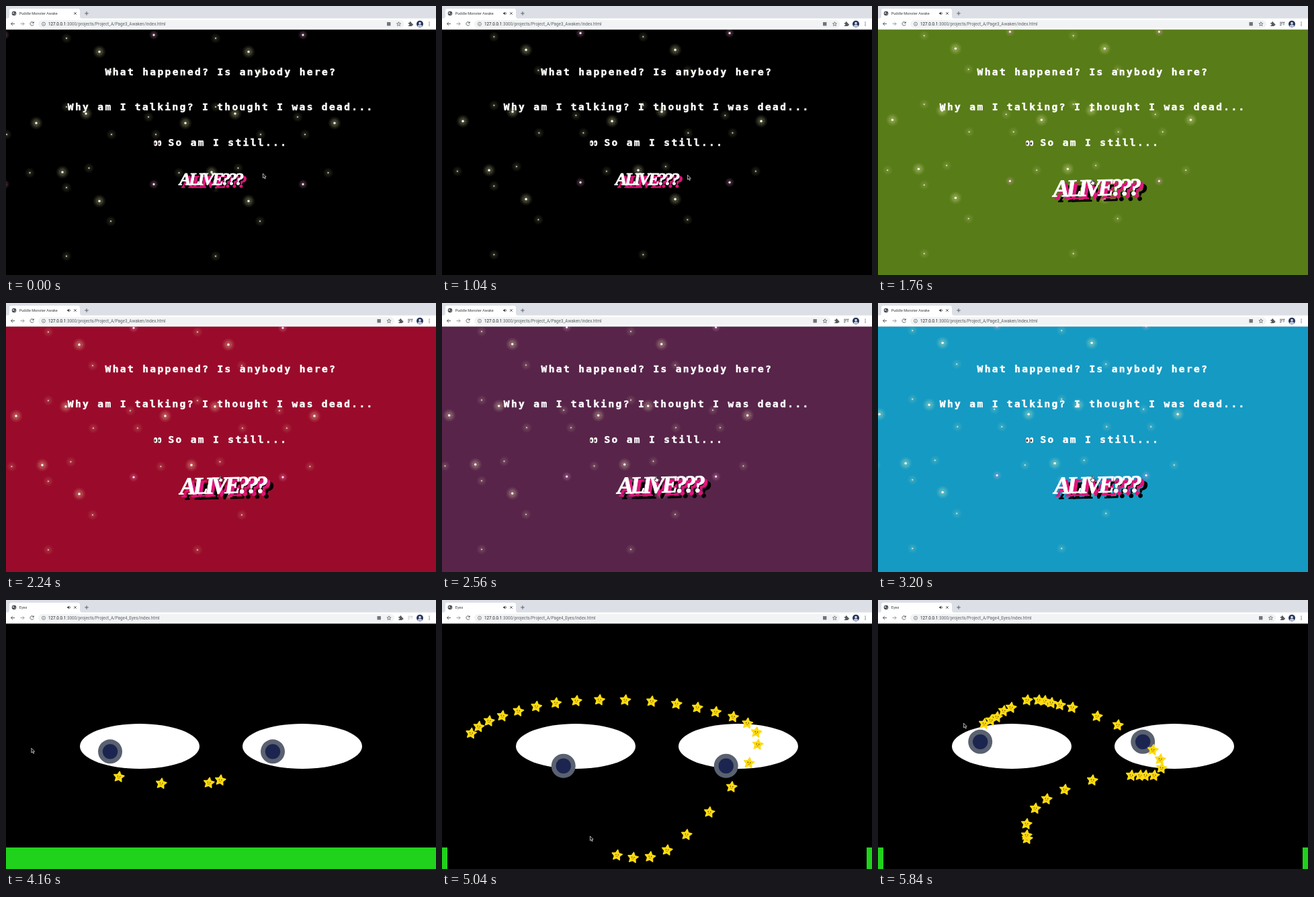
Recreate the animation shown at these times as an HTML page. Size 640 px wide and 400 px high, loop 5920 ms.

```html
<!DOCTYPE html>
<html lang="en">
<head>
<meta charset="utf-8">
<title>Awake</title>
<style>
  html, body { margin: 0; width: 100%; height: 100%; overflow: hidden; background: #000; }
  svg { display: block; width: 640px; height: 400px; }
  text { white-space: pre; }
  .ui { font-family: Roboto, Inter, sans-serif; }
  .say { font: bold 14.5px "DejaVu Sans Mono", monospace; letter-spacing: 2.39px; fill: #fff; stroke: #fff; stroke-width: .5; }
  .cry { font-family: "Liberation Serif", serif; font-weight: bold; font-style: italic; stroke-width: .9; stroke-linejoin: round; }
  .line { fill: none; stroke: #5f6368; stroke-width: 1; }
</style>
</head>
<body>
<svg viewBox="0 0 640 400" xmlns="http://www.w3.org/2000/svg">
  <defs>
    <radialGradient id="warm">
      <stop offset="0" stop-color="#ffffd8" stop-opacity=".6"/>
      <stop offset=".3" stop-color="#ffffc0" stop-opacity=".24"/>
      <stop offset="1" stop-color="#ffffb0" stop-opacity="0"/>
    </radialGradient>
    <radialGradient id="pink">
      <stop offset="0" stop-color="#ffe0f4" stop-opacity=".7"/>
      <stop offset=".35" stop-color="#ff9ed8" stop-opacity=".2"/>
      <stop offset="1" stop-color="#ffb0e0" stop-opacity="0"/>
    </radialGradient>
    <g id="big">
      <circle r="10" fill="url(#warm)"/>
      <circle r="4.6" fill="none" stroke="#ffffd0" stroke-width=".8" stroke-dasharray=".8 2.3" opacity=".4"/>
      <circle r="1.6" fill="#fffff0"/>
    </g>
    <g id="mid">
      <circle r="7.5" fill="url(#pink)"/>
      <circle r="4" fill="none" stroke="#fff" stroke-width=".7" stroke-dasharray=".7 2.4" opacity=".35"/>
      <circle r="1.5" fill="#ffeaf6"/>
    </g>
    <g id="small">
      <circle r="8" fill="url(#warm)" opacity=".5"/>
      <circle r=".9" fill="#fffff0" opacity=".85"/>
    </g>
    <g id="smile" transform="rotate(8)">
      <path id="starShape" fill="#fddc10" stroke="#fddc10" stroke-width="1.6" stroke-linejoin="round"/>
      <circle cx="-1.7" cy="-.8" r=".75" fill="#5a3a05"/>
      <circle cx="1.7" cy="-.8" r=".75" fill="#5a3a05"/>
      <path d="M-1.6 1.2Q0 3 1.6 1.2" fill="none" stroke="#a8650a" stroke-width=".7"/>
    </g>
    <g id="pupil">
      <circle r="18" fill="#5a6170"/>
      <circle r="11.2" fill="#1b2550"/>
    </g>
  </defs>

  <g id="awake">
    <rect id="back" y="35" width="640" height="365"/>
    <g id="far"></g>
    <g id="near"></g>
    <text class="say" x="147.6" y="102.8">What happened? Is anybody here?</text>
    <text class="say" x="91.8" y="155.3">Why am I talking? I thought I was dead...</text>
    <g>
      <ellipse cx="222.6" cy="204" rx="2.6" ry="4.2" fill="#fff"/>
      <ellipse cx="228.6" cy="204" rx="2.6" ry="4.2" fill="#fff"/>
      <ellipse cx="221.8" cy="204.6" rx="1.3" ry="2" fill="#4a2c22"/>
      <ellipse cx="227.8" cy="204.6" rx="1.3" ry="2" fill="#4a2c22"/>
    </g>
    <text class="say" x="241.4" y="207.8">So am I still...</text>
    <g id="alive"></g>
  </g>

  <g id="eyes">
    <rect y="35" width="640" height="365" fill="#000"/>
    <rect y="368" width="640" height="32" fill="#20d21c"/>
    <rect id="bar" x="8" y="368" width="624" height="32" fill="#000"/>
    <ellipse cx="199" cy="217.5" rx="89" ry="33.5" fill="#fff"/>
    <ellipse cx="441" cy="217.5" rx="89" ry="33.5" fill="#fff"/>
    <use id="left" href="#pupil"/>
    <use id="right" href="#pupil"/>
    <g id="trail"></g>
  </g>

  <path id="arrow" d="M-1.6-4V2.8L0 1.4 1.2 4 2.3 3.5 1.2 1H3.2Z" fill="#111" stroke="#eee" stroke-width=".7"/>
  <path id="hand" d="M-1-4.2Q0-4.8.6-4V-1.2L3 -.6Q3.8 0 3.4 1.6L2.6 4H-1.2L-3.2.6Q-3-.6-1.6.2L-1 .8Z" fill="#fff" stroke="#222" stroke-width=".8"/>

  <g class="ui">
    <rect width="640" height="19" fill="#dce0e6"/>
    <path d="M2 19Q5 18.5 5 15V7Q5 4 8 4H107Q110 4 110 7V15Q110 18.5 113 19Z" fill="#fff"/>
    <rect y="18.5" width="640" height="16.5" fill="#fff"/>
    <rect y="34.5" width="640" height=".7" fill="#d5d8dc"/>
    <circle cx="12" cy="11" r="3.3" fill="#4b4f54"/>
    <path d="M9.6 10L11.4 9.3 12.2 10.6 10.8 12ZM12.6 12L14.3 11 13.6 13.1Z" fill="#dfe1e5"/>
    <text id="title" x="19.8" y="13" font-size="5.55" fill="#3c4043"></text>
    <g id="sound" fill="#45494d">
      <path d="M91.2 10H92.4L94.2 8.6V13.4L92.4 12H91.2Z"/>
      <path d="M95.2 9.6Q96.6 11 95.2 12.4" fill="none" stroke="#45494d" stroke-width=".7"/>
    </g>
    <path class="line" d="M101.2 9.2L104.8 12.8M104.8 9.2L101.2 12.8M117.2 11H122.8M120 8.2V13.8"/>
    <path class="line" d="M13 26.5H7.5M10 23.9L7.4 26.5 10 29.1"/>
    <path class="line" d="M21.5 26.5H27M24.5 23.9L27.1 26.5 24.5 29.1" opacity=".6"/>
    <path class="line" d="M41 25A2.7 2.7 0 1 0 41.2 27.4M41.3 23.4V25.4H39.3"/>
    <rect id="box" x="48" y="21" height="11.5" rx="5.7" fill="#f1f3f4"/>
    <circle class="line" cx="56" cy="26.7" r="2.6" style="stroke-width:.7"/>
    <path class="line" d="M56 26.3V28.1M56 25V25.6" style="stroke-width:.7"/>
    <text x="63" y="28.8" font-size="6.33" fill="#5f6368"><tspan fill="#202124">127.0.0.1</tspan><tspan id="path"></tspan></text>
    <g id="tools">
      <rect x="567" y="24" width="5.4" height="5.4" fill="#70757a"/>
      <path id="fav" fill="none" stroke="#5f6368" stroke-width=".8"/>
      <path d="M598.8 25H600.6A1.3 1.3 0 1 1 603 25H604.2V26.6A1.2 1.2 0 1 1 604.2 28.8V30H598.8V28.6A1.1 1.1 0 1 0 598.8 26.6Z" fill="#565a5f"/>
    </g>
    <path id="queue" class="line" d="M598 24.3H603M598 26.4H602M598 28.5H600.5M604 24V28.5M603.5 24.2H605.5"/>
    <circle cx="616" cy="26.7" r="5" fill="#253258"/>
    <path d="M612.4 30.2Q613 27.6 616 27.6T619.6 30.2Q616 33 612.4 30.2Z" fill="#b9c3dc"/>
    <circle cx="616" cy="25.6" r="1.8" fill="#d9dbe6"/>
    <g fill="#5f6368"><circle cx="630" cy="24.3" r=".75"/><circle cx="630" cy="26.7" r=".75"/><circle cx="630" cy="29.1" r=".75"/></g>
  </g>
</svg>
<script>
const LOOP = 5920, STEP = 80, HOVER = 1440, PAGE = 3680, MOVE = 4160;
const el = id => document.getElementById(id);
const show = (node, on) => { node.style.display = on ? "" : "none"; };
const put = (node, x, y, turn = 0) =>
  node.setAttribute("transform", `translate(${x.toFixed(2)} ${y.toFixed(2)}) rotate(${turn})`);
const lerp = (a, b, u) => a + (b - a) * u;
const clamp = (v, a, b) => Math.min(b, Math.max(a, v));

function make(tag, parent, attrs) {
  const node = document.createElementNS("http://www.w3.org/2000/svg", tag);
  for (const k in attrs) node.setAttribute(k, attrs[k]);
  return parent.appendChild(node);
}

function starPath(cx, cy, r, inner) {
  const pts = [];
  for (let i = 0; i < 10; i++) {
    const a = Math.PI * i / 5, q = i % 2 ? inner : r;
    pts.push((cx + q * Math.sin(a)).toFixed(2) + " " + (cy - q * Math.cos(a)).toFixed(2));
  }
  return "M" + pts.join("L") + "Z";
}
el("starShape").setAttribute("d", starPath(0, 0, 8, 4));
el("fav").setAttribute("d", starPath(584.5, 26.9, 3.2, 1.4));

// Tiled night sky: one tile, repeated inside the layer bounds; small stars drift slower
const TILE = 222;
const tile = {
  big: [[139, 68], [119, 160], [45, 174], [84, 247]],
  mid: [[220, 43]],
  small: [[90, 48], [156, 98], [90, 150], [212, 165], [1, 191], [157, 191], [123.5, 241], [35.5, 248]]
};
for (const kind in tile)
  for (const [x, y] of tile[kind])
    for (let i = -1; i < 3; i++)
      for (let j = -1; j < 2; j++) {
        const px = x + i * TILE, py = y + j * TILE;
        if (px > -10 && px < 500 && py > 20 && py < 376)
          make("use", el(kind === "small" ? "far" : "near"), { href: "#" + kind, x: px, y: py });
      }

const cries = [["#000", 9, 8], ["#e0157a", 4.5, 4], ["#fff", 0, 0]].map(([c, x, y]) => {
  const node = make("text", el("alive"), { class: "cry", x, y, fill: c, stroke: c });
  node.textContent = "ALIVE???";
  return node;
});
const shakeX = [1, -1, 0, -2, 1], shakeY = [0, .5, 0, 1, 0];

// Pointer path, one point per tick
const TICK = 28, START = 4004, LAG = 65, LIFE = 800;
const knots = [[24, 223], [70, 180], [200, 150], [380, 160], [470, 215], [335, 372], [226, 372]];
function spline(p, s, u) {
  const at = i => p[clamp(i, 0, p.length - 1)];
  return [0, 1].map(d => {
    const a = at(s - 1)[d], b = at(s)[d], c = at(s + 1)[d], e = at(s + 2)[d];
    return b + u * (c - a + u * (2 * a - 5 * b + 4 * c - e + u * (3 * (b - c) + e - a))) / 2;
  });
}
const sweep = [];
for (let i = 0; i <= 30; i++) sweep.push(spline(knots, Math.floor(i / 5), i % 5 / 5));
const way = [
  [319, 268], [302, 272], [231, 273], [168, 263], [110, 240], [60, 226],
  ...sweep,
  [222, 355], [221, 350], [221, 333], [234, 310], [251, 296], [278, 282], [319, 268],
  [377, 261], [390, 261], [398, 261], [411, 261], [422, 250], [420, 237], [409, 223],
  [357, 186], [326, 173], [289, 160], [271, 156], [258, 153], [248, 150], [239, 149],
  [222, 149], [198, 160], [187, 165], [177, 174], [168, 179], [158, 184],
  [147, 185], [136, 186], [124, 188]
];
const smiles = way.map(([x, y]) => make("use", el("trail"), { href: "#smile", x, y }));

function pointer(t) {
  if (t < MOVE) {
    const u = clamp((t - 800) / 720, 0, 1), s = u * u * (3 - 2 * u);
    return [lerp(384, 319, s), lerp(253, 262, s)];
  }
  const k = clamp((t - START) / TICK, 0, way.length - 1.001), i = Math.floor(k);
  return [0, 1].map(d => lerp(way[i][d], way[i + 1][d], k - i));
}

function backColor(t) {
  if (t < HOVER) return "#000";
  if (t < 2000) return "#587c18";
  if (t < 2400) return "#9a0b2b";
  if (t < 2880) return "#58244a";
  return "#159ac3";
}

function drawAwake(t, hover) {
  el("back").setAttribute("fill", backColor(t));
  put(el("near"), -t * .0134, -t * .0027);
  put(el("far"), -t * .0121, -t * .0022);
  const n = t / STEP % 5;
  if (hover) put(el("alive"), 261 + shakeX[n], 283.5 + shakeY[n], -1.2);
  else put(el("alive"), 258, 266);
  for (const c of cries) {
    c.style.fontSize = hover ? "36px" : "26px";
    c.style.letterSpacing = hover ? "-4.4px" : "-3px";
  }
}

function drawEyes(t) {
  const moving = t >= MOVE;
  let gaze = [199, 217.5];
  if (moving) {
    const [x, y] = way[clamp(Math.floor((t - LAG - START) / TICK), 0, way.length - 1)];
    gaze = [108.3 + x * 178 / 640, 183.5 + (y - 35) * 67 / 365];
  }
  put(el("left"), gaze[0], gaze[1]);
  put(el("right"), gaze[0] + 242, gaze[1]);
  show(el("bar"), t >= 4880);
  smiles.forEach((s, k) => {
    const age = t - START - k * TICK;
    show(s, moving && age >= LAG && age <= LIFE);
  });
}

function drawChrome(t, eyes) {
  const wide = t >= HOVER && t < 5040;
  el("title").textContent = eyes ? "Eyes" : "Puddle Monster Awake";
  el("path").textContent = ":3000/projects/Project_A/" + (eyes ? "Page4_Eyes" : "Page3_Awaken") + "/index.html";
  show(el("sound"), t >= 640);
  show(el("queue"), wide);
  el("queue").setAttribute("opacity", eyes ? .35 : 1);
  put(el("tools"), wide ? -14.5 : 0, 0);
  el("box").setAttribute("width", wide ? 530 : 544.5);
}

function draw(time) {
  const t = Math.floor(time % LOOP / STEP) * STEP;
  const eyes = t >= PAGE, hover = t >= HOVER && !eyes;
  show(el("awake"), !eyes);
  show(el("eyes"), eyes);
  if (eyes) drawEyes(t); else drawAwake(t, hover);
  drawChrome(t, eyes);
  const [x, y] = pointer(t);
  const hand = hover || eyes && t < MOVE;
  show(el("hand"), hand);
  show(el("arrow"), !hand);
  put(el(hand ? "hand" : "arrow"), x, y);
}

let first;
function frame(now) {
  if (first === undefined) first = now;
  draw(now - first);
  requestAnimationFrame(frame);
}
draw(0);
requestAnimationFrame(frame);
</script>
</body>
</html>
```
